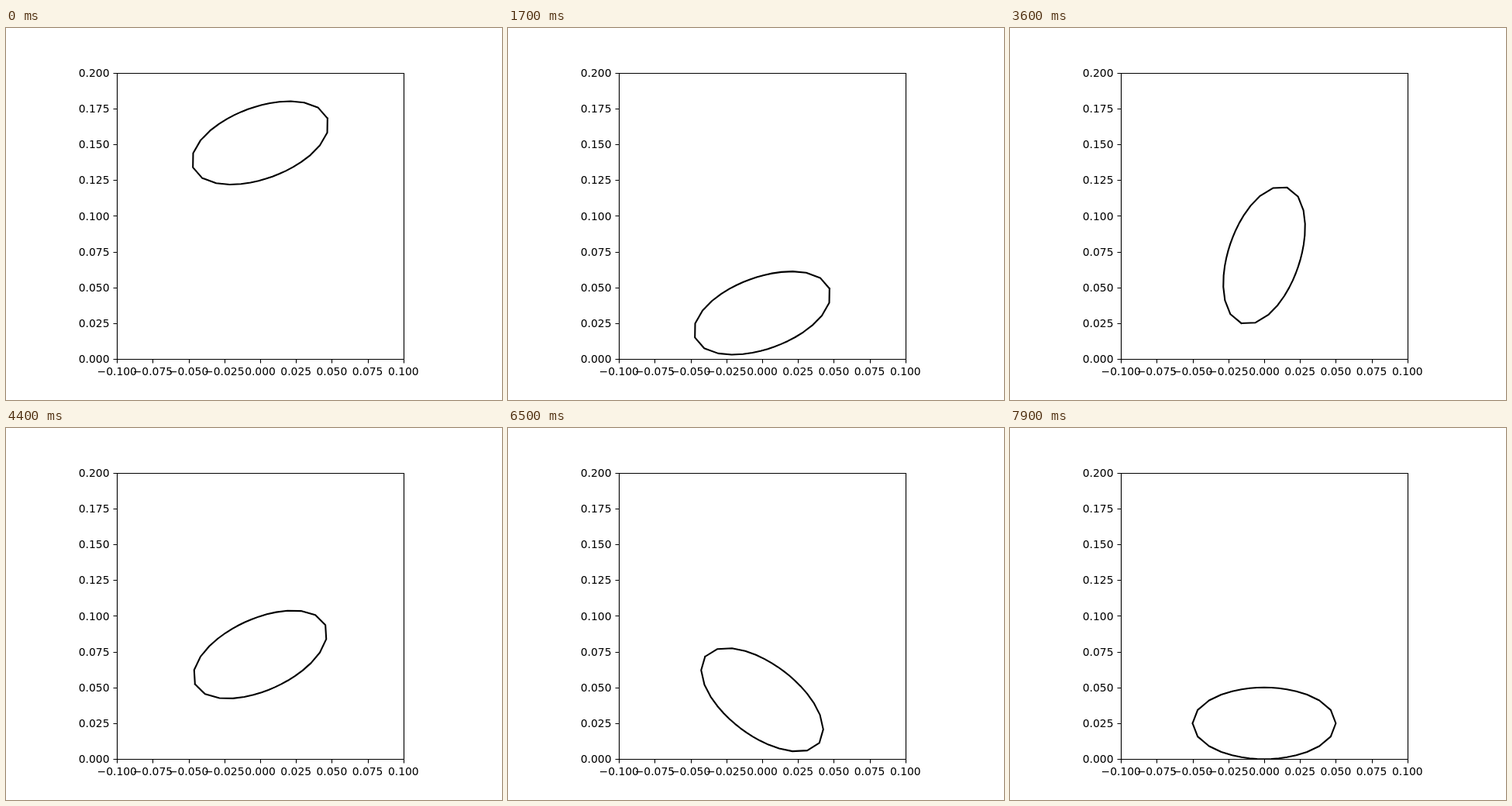
These frames come from a looping animation (640 by 480 pixels, 8000 ms). An HTML page:

```html
<!DOCTYPE html>
<html lang="en">
<head>
<meta charset="utf-8">
<title>Bouncing ellipse</title>
<style>
  html, body { margin: 0; width: 100%; height: 100%; overflow: hidden; background: #fff; }
  svg { display: block; }
  text { font: 13.89px "DejaVu Sans", sans-serif; }
  path { fill: none; stroke: #000; }
</style>
</head>
<body>
<svg width="640" height="480" viewBox="0 0 640 480">
  <clipPath id="area"><rect x="143.2" y="57.6" width="369.6" height="369.6"/></clipPath>
  <g clip-path="url(#area)">
    <path id="ellipse" stroke-width="2.083" stroke-linejoin="round" stroke-linecap="square"/>
  </g>
  <path id="axes" stroke-width="1.11"/>
  <g id="labels"></g>
</svg>
<script>
const A = 0.05, B = 0.025;         // semi-axes in metres
const SCALE = 1848, X0 = 328, Y0 = 427.2;
const STEP = 0.005, HALF_G = 4.905;
const SIDES = 32, FRAMES = 80, FRAME_MS = 100;
const byId = id => document.getElementById(id);
const rad = deg => deg * Math.PI / 180;
const snap = v => Math.round(v) + 0.5;

function addLabel(value, x, y, anchor) {
  const text = document.createElementNS("http://www.w3.org/2000/svg", "text");
  text.setAttribute("x", x);
  text.setAttribute("y", y);
  text.setAttribute("text-anchor", anchor);
  text.textContent = value.toFixed(3).replace("-", "\u2212");
  byId("labels").append(text);
}

function drawAxes() {
  let d = "M143.5 58.5H513.5V427.5H143.5Z";
  for (let i = 0; i <= 8; i++) {
    const x = 143.2 + 46.2 * i, y = Y0 - 46.2 * i;
    d += `M${snap(x)} 427.5v5M143.5 ${snap(y)}h-5`;
    addLabel((i - 4) * 0.025, x, 448, "middle");
    addLabel(i * 0.025, 133.5, y + 5.2, "end");
  }
  byId("axes").setAttribute("d", d);
}

// Centre height at which the tilted ellipse touches the floor
const restHeight = deg => Math.hypot(A * Math.sin(rad(deg)), B * Math.cos(rad(deg)));

// Free flight through height y with speed v at step n0
function flight(n, n0, y, v, deg, spin) {
  const s = (n - n0) * STEP;
  return [y + v * s - HALF_G * s * s, deg + spin * (n - n0)];
}

function rocking(n, n0, deg, spin) {
  const angle = deg + spin * (n - n0);
  return [restHeight(angle), angle];
}

function pose(n) {
  if (n < 18) return flight(n, -20, 0.2, 0, 20, 0);
  if (n < 21) return rocking(n, 18, 14, -11.6);
  if (n < 58) return flight(n, 27, 0.053, 0.652, -55.8, -5.87);
  if (n < 72) return flight(n, 65, 0.0414, -0.157, 142.9, 2.09);
  return rocking(n, 79, 180, 22.5 / 7);
}

function drawEllipse(n) {
  const [height, deg] = pose(n);
  const points = [];
  for (let i = 0; i <= SIDES; i++) {
    const a = 2 * Math.PI * i / SIDES;
    const r = SCALE * A * B / Math.hypot(B * Math.cos(a), A * Math.sin(a));
    const dir = a + rad(deg);
    const x = X0 + r * Math.cos(dir);
    const y = Y0 - SCALE * height - r * Math.sin(dir);
    points.push(x.toFixed(2) + " " + y.toFixed(2));
  }
  byId("ellipse").setAttribute("d", "M" + points.join("L"));
}

function tick() {
  drawEllipse(Math.floor((performance.now() - start) / FRAME_MS) % FRAMES);
  requestAnimationFrame(tick);
}

drawAxes();
const start = performance.now();
tick();
</script>
</body>
</html>
```
